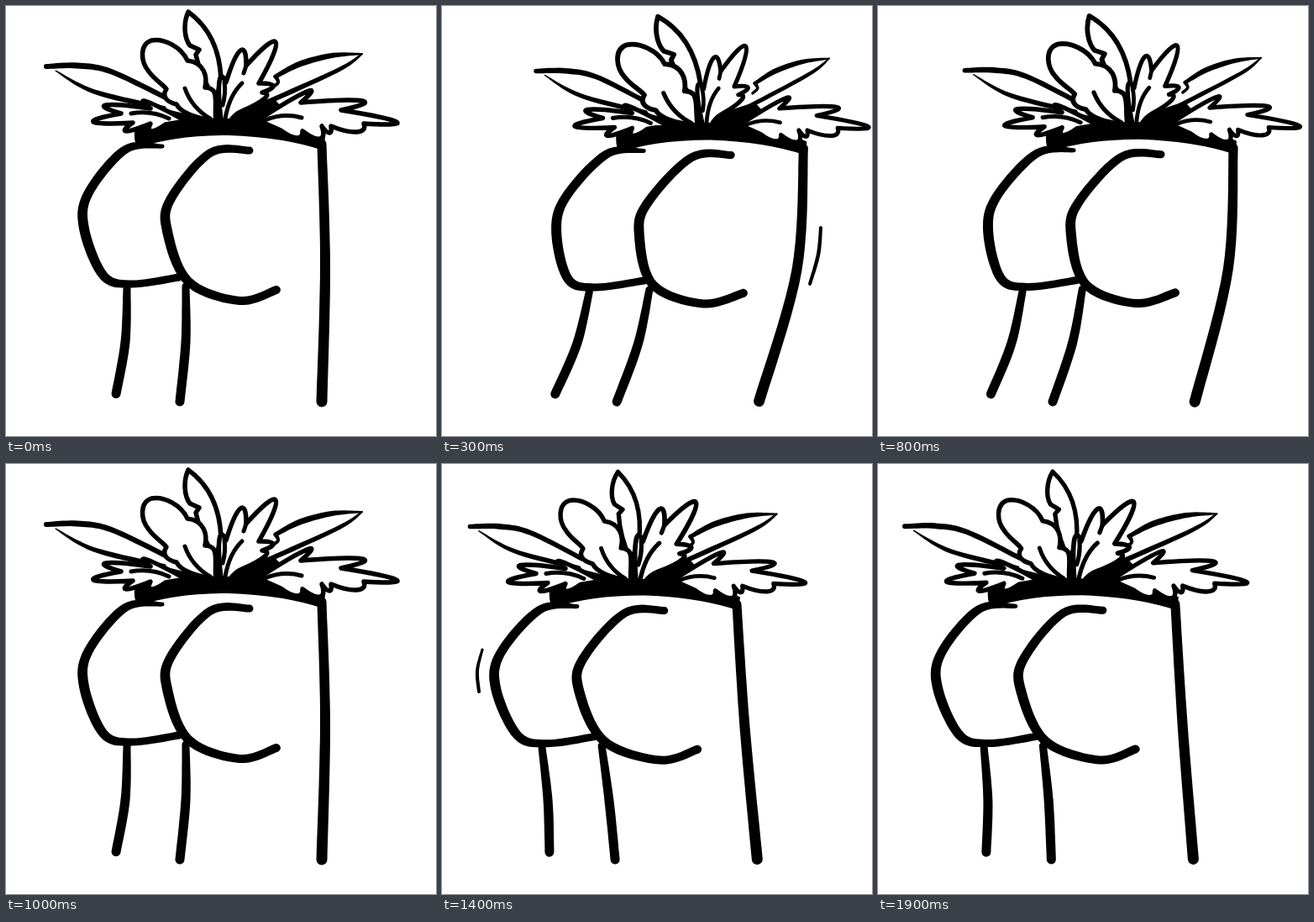
Animation, 512 px wide and 512 px high, one loop 2000 ms. Source, as an HTML page:

```html
<!DOCTYPE html>
<html>
<head>
<meta charset="utf-8">
<style>
html, body { margin: 0; width: 100%; height: 100%; overflow: hidden; background: #fff; }
svg { display: block; width: 100vw; height: 100vh; }
.petal { fill: #fff; stroke: #000; stroke-width: 5.5; stroke-linejoin: round; }
.vein { fill: none; stroke: #000; stroke-width: 5; stroke-linecap: round; }
</style>
</head>
<body>
<svg id="stage" viewBox="0 0 512 512"></svg>
<script>
const stage = document.getElementById('stage');
const LOOP = 2000, STEP = 100;

function add(tag, attrs, parent = stage) {
  const el = document.createElementNS('http://www.w3.org/2000/svg', tag);
  for (const k in attrs) el.setAttribute(k, attrs[k]);
  parent.appendChild(el);
  return el;
}

// Outline of a brush stroke through [x, y, width] points
function brush(pts) {
  const mid = [], n = pts.length;
  const at = i => pts[Math.max(0, Math.min(n - 1, i))];
  for (let i = 0; i < n - 1; i++) {
    for (let s = 0; s < 10; s++) {
      const u = s / 10;
      mid.push([0, 1, 2].map(c => {
        const a = at(i - 1)[c], b = at(i)[c], d = at(i + 1)[c], e = at(i + 2)[c];
        return b + u * (d - a + u * (2 * a - 5 * b + 4 * d - e + u * (3 * (b - d) + e - a))) / 2;
      }));
    }
  }
  mid.push(pts[n - 1]);
  const left = [], right = [];
  mid.forEach(([x, y, w], i) => {
    const p = mid[Math.max(0, i - 1)], q = mid[Math.min(mid.length - 1, i + 1)];
    const len = Math.hypot(q[0] - p[0], q[1] - p[1]) || 1;
    const nx = (p[1] - q[1]) / len * w / 2, ny = (q[0] - p[0]) / len * w / 2;
    left.push((x + nx).toFixed(1) + ' ' + (y + ny).toFixed(1));
    right.unshift((x - nx).toFixed(1) + ' ' + (y - ny).toFixed(1));
  });
  const cap = w => `A${w / 2} ${w / 2} 0 0 0 `;
  return 'M' + left.join('L') + cap(pts[n - 1][2]) + right.join('L') + cap(pts[0][2]) + left[0] + 'Z';
}

// Leaf outline of round lobes: a start point, then tip and notch of each lobe
function frond(start, ...lobes) {
  let [x, y] = start, d = `M${x} ${y}`;
  for (const [tx, ty, nx, ny] of lobes) {
    const wx = (nx - x) * 0.4, wy = (ny - y) * 0.4;
    const past = (from, tip) => from + (tip - from) * 4 / 3;
    d += `C${past(x, tx) - wx} ${past(y, ty) - wy} ${past(nx, tx) + wx} ${past(ny, ty) + wy} ${nx} ${ny}`;
    [x, y] = [nx, ny];
  }
  return d + 'Z';
}

// Roots ride on the hips; tips add lag (share of the sway) and fan (spread while swaying)
const parts = [
  { root: [190, 115], tip: [45, 72], lag: 0, fan: 11,
    strokes: [[[48, 72, 6], [85, 71, 7], [125, 78, 6.5], [192, 110, 6]],
              [[59, 77, 1.5], [105, 102, 5.5], [188, 122, 6]]] },
  { root: [250, 112], tip: [217, 5], lag: -0.4, fan: 8,
    shape: 'M217 7C211 20 212 38 219 47L230 52L226 58Q232 86 250 112L256 88C255 58 246 28 217 7Z' },
  { root: [312, 110], tip: [424, 57], lag: -0.22, fan: -6,
    strokes: [[[424, 57, 2], [388, 59, 6], [350, 69, 7], [321, 84, 5]],
              [[321, 84, 5], [324, 91, 4], [317, 97, 4]],
              [[424, 57, 2], [396, 76, 5], [310, 115, 6]]] },
  { root: [265, 150], tip: [265, 50], lag: 0, fan: 0,
    solid: 'M153 148Q172 141 196 139L188 122L228 132L250 108L272 124L318 109L346 140L380 156L378 172Q330 156 265 154Q200 154 157 169Q152 162 153 148Z' },
  { root: [248, 137], tip: [175, 42], lag: -0.15, fan: 0,
    shape: 'M250 137C248 124 252 108 247 101Q243 97 237 97C240 84 236 67 216 65C209 49 188 38 173 41C159 46 160 66 170 78C177 88 187 93 191 99C184 109 194 115 203 117Q210 131 250 137Z',
    vein: 'M213 98Q221 121 243 134' },
  { root: [258, 136], tip: [318, 42], lag: -0.25, fan: 0,
    shape: frond([256, 136], [254, 90, 262, 91], [279, 53, 286, 71], [321, 43, 301, 92],
      [318, 95, 305, 103], [308, 110, 281, 125], [273, 130, 267, 137]),
    vein: 'M281 92Q266 106 261 134M260 90Q262 104 258 118M286 71L283 80' },
  { root: [212, 136], tip: [103, 138], lag: 0, fan: 0,
    shape: frond([214, 137], [168, 114, 172, 122], [119, 118, 137, 128], [104, 138, 151, 139],
      [143, 149, 172, 140], [173, 149, 190, 141]),
    vein: 'M149 128Q173 124 194 134' },
  { root: [302, 136], tip: [466, 138], lag: -0.06, fan: -10,
    shape: frond([300, 136], [358, 102, 351, 115], [424, 113, 399, 124], [465, 138, 426, 140],
      [418, 150, 387, 143], [385, 151, 376, 143], [374, 158, 353, 149], [346, 157, 327, 148]),
    vein: 'M308 136Q330 127 352 133' }
];

for (const p of parts) {
  p.el = add('g', {});
  if (p.solid) add('path', { d: p.solid }, p.el);
  if (p.shape) add('path', { d: p.shape, class: 'petal' }, p.el);
  if (p.vein) add('path', { d: p.vein, class: 'vein' }, p.el);
  (p.strokes || []).forEach(s => add('path', { d: brush(s) }, p.el));
}

// Two cheeks, three legs
const body = [
  [[186, 167, 5], [142, 171, 10], [98, 223, 11], [93, 265, 12], [116, 321, 11], [150, 331, 9], [206, 323, 9]],
  [[290, 172, 9], [243, 175, 10], [196, 230, 11], [192, 268, 12], [217, 328, 11], [278, 351, 10], [322, 338, 10]],
  [[144, 336, 9], [142, 400, 11], [131, 462, 11]],
  [[214, 334, 9], [214, 400, 11], [207, 471, 11]],
  [[376, 164, 11], [380, 310, 12], [376, 471, 13]]
].map(pts => ({ pts, el: add('path', {}) }));

const swish = [
  { from: 200, to: 400, pts: [[451, 264, 4], [448, 296, 4.5], [438, 331, 4]] },
  { from: 1200, to: 1700, pts: [[48, 221, 3], [42, 246, 4], [44, 271, 4]] }
];
swish.forEach(s => s.el = add('path', { d: brush(s.pts) }));

// A wide swing to the right with a rebound, then a smaller one to the left
function sway(a) {
  return a < Math.PI
    ? 51 * Math.sin(a) + 24 * Math.sin(3 * a) + 6 * Math.sin(2 * a)
    : 35 * Math.sin(a) + 14 * Math.sin(3 * a);
}

// Feet stay planted, the hips carry the upper body, the cheeks push out
function bend([x, y, w], hip, drop, push) {
  const r = Math.min(1, Math.max(0, y - 165) / 310), f = 1 - r * r;
  const side = Math.max(0, Math.min(1, (330 - x) / 140));
  return [x + hip * f - push * side * Math.sin(Math.PI * r), y + drop * f, w];
}

// Turn and scale a part so its root and tip land where they should
function place({ el, root: [rx, ry], tip, lag, fan }, hip, drop, spread) {
  const ax = tip[0] - rx, ay = tip[1] - ry, bx = ax + lag * hip + fan * spread;
  const q = ax * ax + ay * ay;
  const c = (ax * bx + ay * ay) / q, s = (ax * ay - ay * bx) / q;
  const e = rx + hip - c * rx + s * ry, f = ry + drop - s * rx - c * ry;
  el.setAttribute('transform', `matrix(${c} ${s} ${-s} ${c} ${e} ${f})`);
}

function draw(t) {
  const angle = 2 * Math.PI * t / LOOP, swing = Math.abs(Math.sin(angle));
  const hip = sway(angle), drop = Math.abs(hip) / 10;
  parts.forEach(p => place(p, hip, drop, Math.sqrt(swing)));
  body.forEach(b => b.el.setAttribute('d', brush(b.pts.map(p => bend(p, hip, drop, 8 * swing)))));
  swish.forEach(s => s.el.setAttribute('visibility', t >= s.from && t <= s.to ? 'visible' : 'hidden'));
}

const start = performance.now();
function tick() {
  const t = (performance.now() - start) % LOOP;
  draw(Math.floor(t / STEP) * STEP);
  requestAnimationFrame(tick);
}
tick();
</script>
</body>
</html>
```
